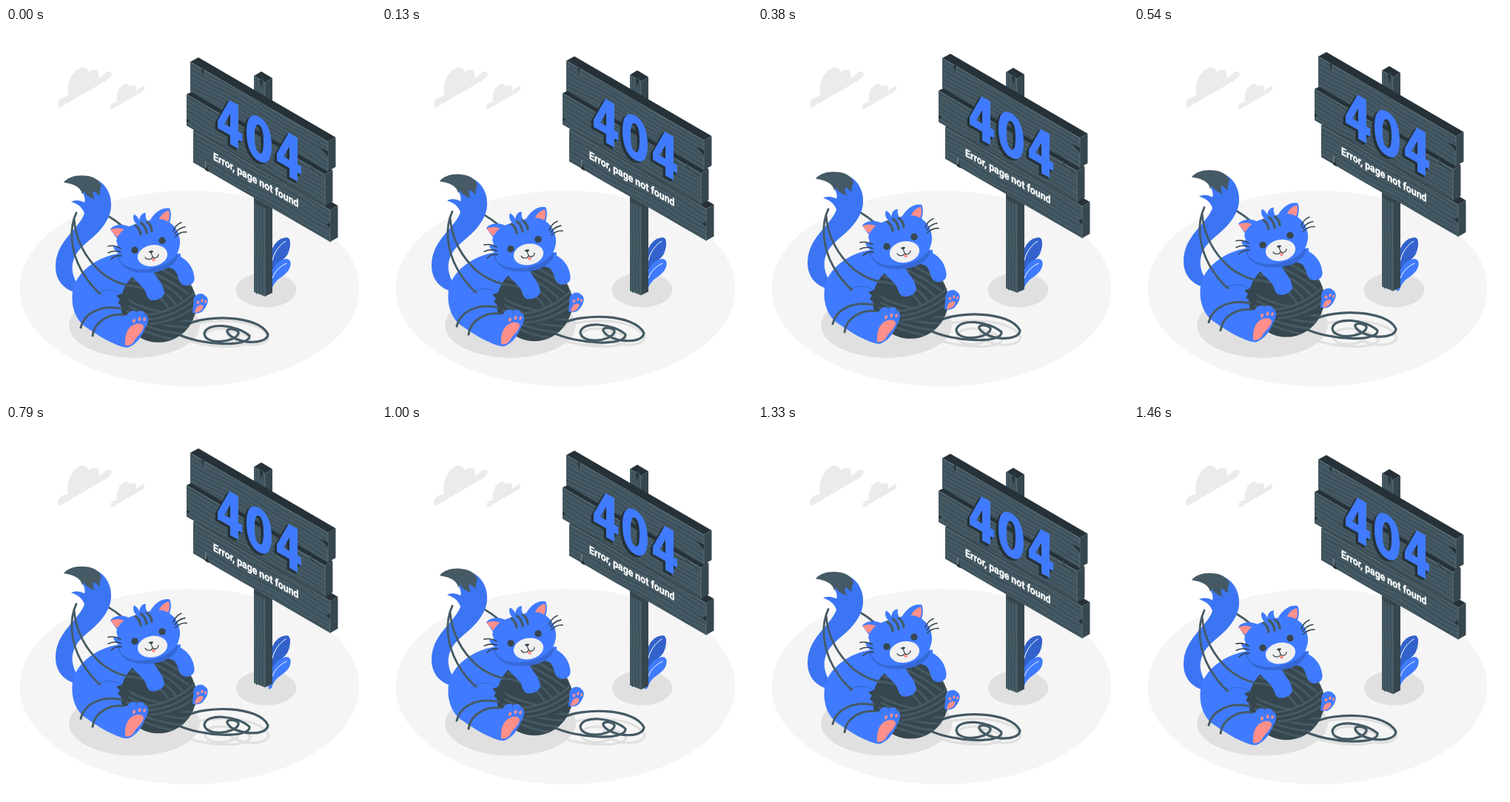
An HTML page with a canvas that plays this animation: 500 px wide and 500 px high, repeating every 1500 ms.

```html
<!DOCTYPE html>
<html lang="en">
<head>
<meta charset="utf-8">
<title>404</title>
<style>
  html, body { margin: 0; width: 100%; height: 100%; overflow: hidden; background: #fff; }
  canvas { display: block; width: 100vw; height: 100vh; }
</style>
</head>
<body>
<canvas id="stage"></canvas>
<script>
const LOOP = 1500, STEPS = 36, RISE = 10, BASE = 0.8, SLOPE = 0.58;
const BLUE = '#407bff', TAIL = '#3c75f3', DEEP = '#3568d6', LEAF = '#3362cc', PINK = '#ff8f8b';
const INK = '#263238', SLATE = '#37474f', GRAIN = '#3b4d56', STEEL = '#455a64', EDGE = '#5d727c';
const SHADOW = '#e0e0e0', CLOUD = '#ebebeb';

const canvas = document.getElementById('stage');
const ctx = canvas.getContext('2d');
const ratio = window.devicePixelRatio || 1;
canvas.width = canvas.height = 500 * ratio;

const paths = new Map();
function shape(d) {
  if (!paths.has(d)) paths.set(d, new Path2D(d));
  return paths.get(d);
}
function fill(d, color) {
  ctx.fillStyle = color;
  ctx.fill(shape(d), 'evenodd');
}
function line(d, color, width) {
  ctx.strokeStyle = color;
  ctx.lineWidth = width;
  ctx.stroke(shape(d));
}
function oval(x, y, rx, ry, color, turn = 0) {
  ctx.fillStyle = color;
  ctx.beginPath();
  ctx.ellipse(x, y, rx, ry, turn, 0, Math.PI * 2);
  ctx.fill();
}
function group(draw) {
  ctx.save();
  draw();
  ctx.restore();
}

const CLOUD_PATH = 'M70 104C70 97 75 94 84 92C82 79 85 67 93 59C101 51 110 52 111 60C115 56 123 55 125 60C126 63 125 66 126 69C131 62 140 56 142 60C144 65 140 68 134 72L79 104C73 108 70 108 70 104Z';
const STRAND = 'M245 400C268 387 341 386 354 413C353 429 307 426 299 410C297 403 316 406 314 412C309 425 269 428 268 412C271 396 312 400 329 415C331 431 264 429 230 412';

function drawGround() {
  oval(248, 352, 229.5, 132.3, '#f5f5f5');
  fill(CLOUD_PATH, CLOUD);
  group(() => {
    ctx.translate(141 - 70 * 0.64, 75 - 53 * 0.64);
    ctx.scale(0.64, 0.64);
    fill(CLOUD_PATH, CLOUD);
  });
  oval(173.5, 402, 88.5, 43.5, SHADOW);
  oval(351.5, 354, 41, 23.5, SHADOW);
  group(() => {
    ctx.translate(1, 4.5);
    line(STRAND, SHADOW, 3.2);
  });
  drawLeaves();
}

function drawLeaves() {
  fill('M357 334C354 312 358 285 379 283C386 283 385 296 381 305C376 315 363 318 360 332Z', LEAF);
  line('M358 326C359 310 365 296 378 288', '#fff', 1);
  fill('M355 356C353 336 363 313 379 312C386 312 386 321 382 327C376 337 363 338 359 354Z', BLUE);
  line('M357 349C359 335 366 324 379 318', '#fff', 1);
}

function drawPost() {
  fill('M335 64L350 73V362L335 356Z', STEEL);
  fill('M350 73L360 67V357L350 362Z', SLATE);
  fill('M335 64L345 58L360 67L350 73Z', INK);
  for (let i = 0; i < 3; i++) {
    const x = 338.5 + i * 4;
    line(`M${x} 67C${x + 3} 85 ${x - 2} 95 ${x} 110M${x} 235C${x - 3} 265 ${x + 3} 285 ${x} 310S${x + 1} 340 ${x} 358`, GRAIN, 1.2);
  }
  line('M335.4 64L350 73V361', EDGE, 0.7);
  fill('M343 69L347 71L345 81Z', INK);
  fill('M335 225H360V238L350 243L335 235Z', 'rgba(38,50,56,.45)');
}

function drawPlank(left, top, right, height, seed) {
  const end = top + (right - left) * SLOPE;
  const face = `M${left} ${top}L${right} ${end}V${end + height}L${left} ${top + height}Z`;
  fill(`M${left} ${top}l11 -6L${right + 10.5} ${end - 6}L${right} ${end}Z`, INK);
  fill(`M${right} ${end}l10.5 -6v${height}l-10.5 6Z`, SLATE);
  fill(face, STEEL);
  group(() => {
    ctx.clip(shape(face));
    ctx.transform(1, SLOPE, 0, 1, left, top);
    ctx.strokeStyle = GRAIN;
    for (let row = 0; row < 7; row++) {
      ctx.lineWidth = 1.4 + (row * 7 + seed) % 3 * 0.5;
      ctx.beginPath();
      for (let x = 0; x <= right - left; x += 3) {
        const wave = Math.sin(x / 15 + seed * 2 + row * 0.35) + Math.sin(x / 37 + seed);
        ctx.lineTo(x, 3 + row * height / 6.8 + wave * 1.3);
      }
      ctx.stroke();
    }
  });
  line(`M${left} ${top}L${right} ${end}V${end + height}`, EDGE, 0.9);
}

const FOUR = 'M17 87H29V123H34V134H29V146H18V134H1V124ZM18 105L10 123H18Z';
const ZERO = 'M57 87C68 87 74 98 74 117C74 136 68 147 57 147C46 147 40 136 40 117C40 98 46 87 57 87ZM57 98C53 98 51 104 51 117C51 130 53 136 57 136C61 136 63 130 63 117C63 104 61 98 57 98Z';

function drawDigits(color, dx, dy) {
  group(() => {
    ctx.transform(1, 0.565, 0, 1, 285 + dx, dy);
    fill(FOUR, color);
    fill(ZERO, color);
    ctx.translate(80, -1);
    fill(FOUR, color);
  });
}

function drawSign() {
  drawPlank(253, 138, 438, 43, 1);
  drawPlank(244, 89, 431, 42, 2);
  drawPlank(249, 45, 435, 40, 3);

  fill('M264 54L268 56L267 66Z', INK);
  line('M268 56L267.5 66', EDGE, 0.7);
  fill('M435 166L425 161L435 173Z', INK);
  fill('M431 203L414 190L412 182L411 190Z', INK);
  line('M412 184V191L422 197', EDGE, 0.8);
  fill('M269 191L270 179L274 194Z', INK);
  line('M270 180V188', '#c5cfd4', 0.8);
  fill('M438 262L433 265L438 270Z', INK);
  fill('M249 124L244 122V127Z', INK);

  for (let i = 4; i > 0; i--) drawDigits(INK, -i * 0.85, i * 0.5);
  drawDigits(BLUE, 0, 0);

  group(() => {
    ctx.transform(0.866, 0.487, 0, 1, 280, 177);
    ctx.font = '700 14.2px Roboto, sans-serif';
    ctx.fillStyle = ctx.strokeStyle = '#fff';
    ctx.lineWidth = 0.4;
    ctx.fillText('Error, page not found', 0, 0);
    ctx.strokeText('Error, page not found', 0, 0);
  });
}

function drawTail() {
  fill('M124 205C144 216 146 243 137 258C128 276 112 285 100 298C88 311 85 330 99 349L92 356C76 351 67 338 67 322C67 287 98 272 106 250C103 241 97 237 88 234C94 231 101 232 106 235C108 230 105 222 98 214Z', TAIL);
  fill('M78 208C83 200 98 197 109 199C119 200 126 205 129 212C127 217 126 222 127 226L118 219C117 223 118 227 120 231C113 228 108 225 105 220L103 224C101 213 90 210 78 208Z', STEEL);
}

function drawYarn() {
  oval(206, 372.5, 51, 51.5, SLATE);
  group(() => {
    ctx.beginPath();
    ctx.arc(206, 372.5, 51.3, 0, Math.PI * 2);
    ctx.clip();
    for (let i = 0; i < 5; i++) {
      line(`M${160 + i * 10} ${347 - i * 7}C${188 + i * 8} ${347 - i * 4} ${212 + i * 6} ${361 - i * 5} ${222 + i * 8} ${382 - i * 8}`, STEEL, 3);
      line(`M${150 + i * 2} ${356 + i * 10}C${170 + i * 4} ${374 + i * 9} ${206 + i * 3} ${388 + i * 8} ${260 - i * 4} ${386 + i * 9}`, STEEL, 3);
    }
    fill('M190 388C216 386 242 375 259 350V384C236 399 211 403 184 398Z', SLATE);
    for (let i = 0; i < 3; i++) {
      line(`M${189 + i * 3} ${387 + i * 6}C${216 + i * 2} ${385 + i * 6} ${240 + i * 2} ${372 + i * 7} 259 ${353 + i * 10}`, STEEL, 3);
    }
  });
}

function drawBody() {
  fill('M153 304C124 308 94 329 90 355C87 378 96 396 109 404C126 416 145 428 164 431L190 394L236 330V304Z', BLUE);
  line('M121 359C134 350 151 352 160 362', DEEP, 1.2);
  line('M95 249C85 270 87 300 102 327C109 339 117 350 127 358M92 257C94 286 108 311 128 329C139 338 149 343 161 346', STEEL, 2.8);
  line('M101 404C105 386 126 373 154 378M117 415C119 397 140 382 164 388', STEEL, 3);
}

function drawFeet() {
  fill('M254 363C260 356 267 358 269 361C275 364 273 373 268 379C264 385 258 386 252 384Z', BLUE);
  fill('M255 384C256 376 261 372 266 374C268 378 262 384 255 384Z', PINK);
  oval(259.5, 370, 1.8, 2.3, PINK, 0.3);
  oval(265, 367.5, 1.6, 2.2, PINK, 0.3);
  oval(269.5, 369, 1.4, 2.1, PINK, 0.3);

  fill('M158 358L149 361L154 366L151 371L157 375L160 386L168 370Z', SLATE);
  fill('M140 392C150 390 158 389 164 387C166 381 173 380 177 383C183 380 187 382 188 386C194 388 193 398 188 405C184 416 176 427 165 431C156 431 145 426 138 420Z', BLUE);
  fill('M161 428C160 414 164 404 173 400C180 397 187 399 186 404C184 411 177 416 174 421C171 427 167 429 161 428Z', PINK);
  oval(173, 395, 1.9, 2.7, PINK, 0.35);
  oval(180.5, 392.5, 1.9, 2.7, PINK, 0.25);
  oval(187, 393, 1.6, 2.5, PINK, 0.25);
  line('M176 384L177 388M187 386L186 389', DEEP, 0.8);
}

function drawArms() {
  fill('M158 314C165 333 176 340 185 350C191 357 189 364 196 367C204 368 213 364 214 357C213 346 205 338 199 329L188 315Z', BLUE);
  line('M198 366L196 361M206 365L204 360', DEEP, 0.9);
  fill('M211 316C224 319 230 327 233 337C235 345 240 349 246 347C253 346 256 341 254 333C252 321 244 311 231 306Z', BLUE);
  line('M241 347L239 342M249 346L247 341', DEEP, 0.9);
}

function drawHead() {
  fill('M150 306C155 328 177 332 199 329.5C218 327 231 318 233 305Z', DEEP);
  fill('M150 284L141 271C147 264 159 263 169 269Z', BLUE);
  fill('M195 258C202 247 212 241 221 243C224 248 223 258 220 265Z', BLUE);
  fill('M150 282L141 272C149 268 157 270 163 273C157 275 153 278 150 282Z', PINK);
  fill('M206 259C209 252 214 247 220 246C222 251 221 256 219 261C214 258 210 257 206 259Z', PINK);
  fill('M149 287C153 273 164 267 176 264C172 260 171 255 173 251C177 253 179 256 180 259C181 253 184 249 189 249C188 253 189 257 191 260C205 254 219 258 227 267C234 275 237 288 234 296C231 312 215 320 197 324C179 328 157 324 153 310C154 308 156 307 158 307C152 305 147 301 145 295C148 295 150 294 151 293Z', BLUE);
  line('M175 266Q181 270 182 278M182.5 262.5Q189 267 190 276M190.5 261.5Q196 265 197 273', STEEL, 3.4);

  oval(174, 299.5, 4.7, 4.7, SLATE);
  oval(211, 286.5, 4.7, 4.7, SLATE);
  oval(198, 306.8, 20.3, 14.3, '#f0f0f0', -0.18);
  fill('M197 311C197 315 201 316 202 312L200 309Z', PINK);
  fill('M192.5 302C194 300 197 299.5 199 300.5C199 302 197.5 303.5 196 303.5Z', SLATE);
  line('M196 303L198 308M198 308C197 313 190 313 188 309M198 308C201 312 206 309 206 305', SLATE, 1.2);

  line('M155 297Q147 292 138 294M155 302Q146 299 138 303M156 307Q147 306 142 312', SLATE, 1.6);
  line('M226 274Q229 265 237 262M228 277Q234 269 242 268M229 281Q236 274 244 275', SLATE, 1.6);
}

function drawCat() {
  line(STRAND, STEEL, 3.2);
  line('M136 252Q148 259 160 269', STEEL, 2.8);
  drawTail();
  drawBody();
  drawYarn();
  drawFeet();
  drawArms();
  drawHead();
}

// Linear rise and fall, held on 24 steps per second.
function liftAt(now) {
  const step = Math.floor((now % LOOP) / LOOP * STEPS + 0.1) % STEPS;
  return RISE * (1 - Math.abs(1 - 2 * step / STEPS));
}

function render(now) {
  ctx.setTransform(ratio, 0, 0, ratio, 0, 0);
  ctx.lineCap = ctx.lineJoin = 'round';
  ctx.fillStyle = '#fff';
  ctx.fillRect(0, 0, 500, 500);
  drawGround();
  group(() => {
    ctx.translate(0, BASE - liftAt(now));
    drawPost();
    drawSign();
    drawCat();
  });
}

const start = performance.now();
function tick() {
  render(performance.now() - start);
  requestAnimationFrame(tick);
}
tick();
</script>
</body>
</html>
```
